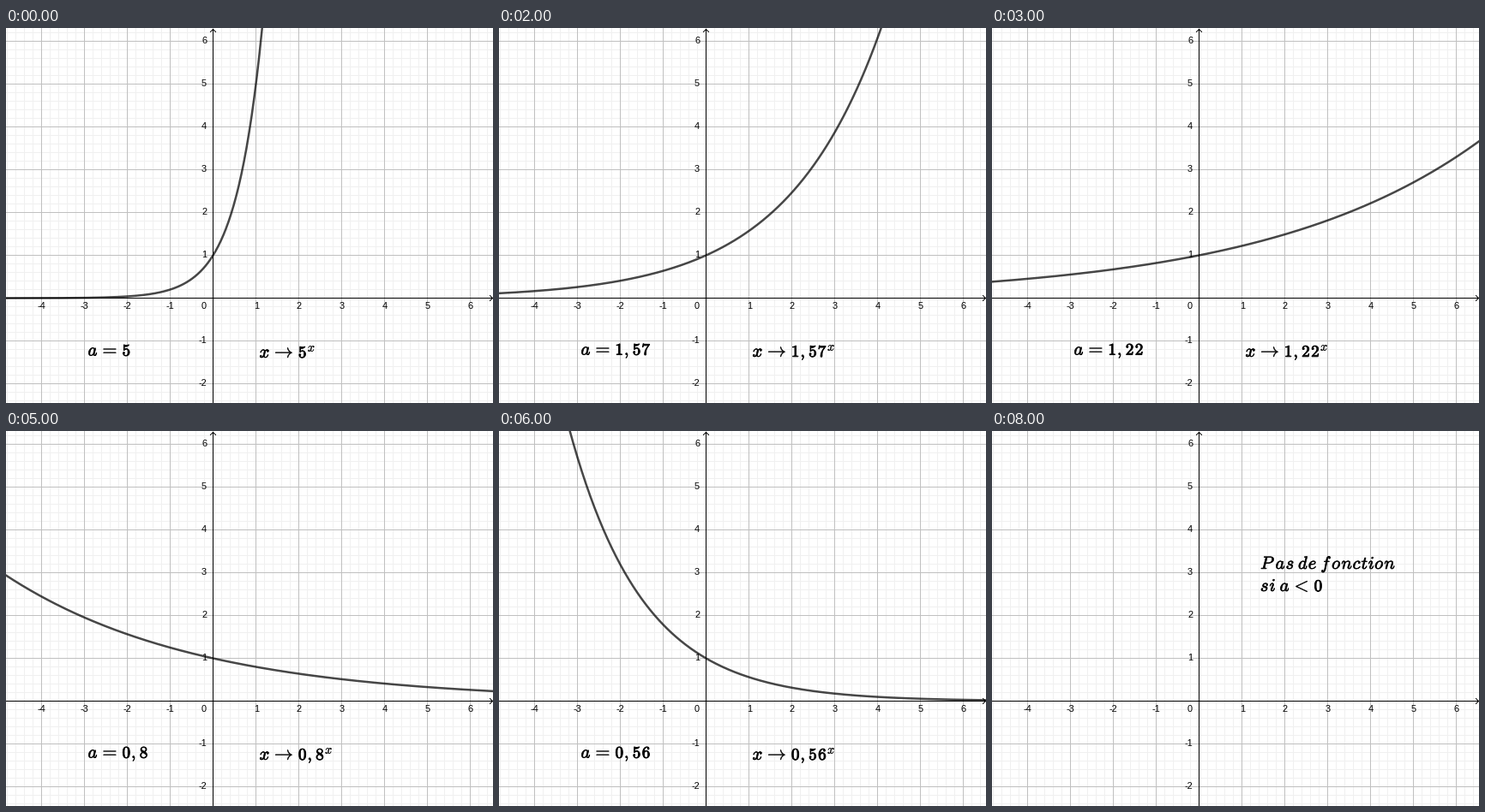
Write a matplotlib script that moves like this. It is 568 px wide and 438 px high and loops after 9 s.

```python
import matplotlib.pyplot as plt
import numpy as np
from matplotlib.animation import ArtistAnimation
from matplotlib.patches import PathPatch
from matplotlib.textpath import TextPath
from matplotlib.transforms import Affine2D

W, H, DPI = 568, 438, 64
PX = 72 / DPI              # one pixel in points
OX, OY, UNIT = 241, 315, 50
EM = 19.1                  # formula type size in pixels

plt.rcParams["mathtext.fontset"] = "cm"
plt.rcParams["font.family"] = "Liberation Sans"
plt.rcParams["axes.unicode_minus"] = False

fig = plt.figure(figsize=(W / DPI, H / DPI), dpi=DPI, facecolor="white")
ax = fig.add_axes([0, 0, 1, 1])
ax.set_xlim(-0.5, W - 0.5)
ax.set_ylim(-0.5, H - 0.5)
ax.axis("off")


def flip(y):
    return H - 1 - y


def line(xs, ys, color, width=1, **kw):
    # Integer coordinates are pixel centres, so snapping is not needed.
    ys = flip(np.asarray(ys, float))
    return ax.plot(xs, ys, color=color, lw=width * PX, snap=False, **kw)[0]


# Grid, axes and tick labels

def grid(step, color, z):
    for x in range(OX % step, W, step):
        line([x, x], [-1, H], color, zorder=z)
    for y in range(OY % step, H, step):
        line([-1, W], [y, y], color, zorder=z)


def tick(x, y, s, ha):
    ax.text(x, flip(y), s, ha=ha, va="baseline", fontsize=11 * PX, zorder=4)


grid(10, "#f0f0f0", 1)
grid(UNIT, "#c0c0c0", 2)
line([-1, W - 1], [OY, OY], "black", zorder=3)
line([OX, OX], [1, H], "black", zorder=3)
line([564, 567, 564], [OY - 3, OY, OY + 3], "black", zorder=3)
line([OX - 3, OX, OX + 3], [4, 1, 4], "black", zorder=3)

for n in range(-4, 7):
    if n:
        tick(OX + n * UNIT + 0.3, 328, str(n), "center")
for n in range(-2, 7):
    y = 328 if n == 0 else OY - n * UNIT + 3
    tick(233.7, y, str(n), "right")


# Bold formula setting: advances in em of the bold math face

LETTERS = dict(P=.92, a=.633, s=.55, d=.595, e=.54, f=.67, o=.57,
               n=.715, c=.513, t=.415, i=.404, x=.659)
OPERATORS = {"=": (.894, "="), "<": (.894, "<"), "→": (1.15, r"\rightarrow")}
THIN, MEDIUM = .167, .278


def glyph(tex, mid, base, size, stroke):
    """Draw one symbol with its ink centred on mid."""
    path = TextPath((0, 0), f"${tex}$", size=size)
    box = path.get_extents()
    shift = Affine2D().translate(mid - (box.x0 + box.x1) / 2, flip(base))
    return ax.add_patch(PathPatch(shift.transform_path(path), fc="black",
                                  ec="black", lw=stroke * PX, snap=False,
                                  zorder=6))


def formula(x, base, text):
    out, sup = [], False
    for ch in text:
        before = after = 0
        y, size, stroke, tex = base, EM, .7, ch
        if ch == "^":
            sup = True
            continue
        if ch == " ":
            x += .23 * EM
            continue
        if ch in OPERATORS:
            adv, tex = OPERATORS[ch]
            before = after = MEDIUM
            size, stroke = size * 1.15, .45
        elif ch == ",":
            adv, after = .319, THIN
        elif ch.isdigit():
            adv, stroke = .575, .9
        else:
            adv = LETTERS[ch]
            size *= 1.08
        if sup:
            adv, size, stroke = adv * .74, size * .7, .35
            y -= .375 * EM
            sup = False
        x += before * EM
        out.append(glyph(tex, x + adv * EM / 2, y, size, stroke))
        x += (adv + after) * EM
    return out


def scene(a):
    """Curve of a**x with its two captions."""
    x = np.arange(-5, 6.8, .02)
    y = a ** x
    y[y > 7] = np.nan
    curve = line(OX + UNIT * x, OY - UNIT * y, "black", 2.5, alpha=.72, zorder=5)
    num = f"{a:g}".replace(".", ",")
    drop = 0 if "," in num else 1
    tail = "=1" if a == 1 else ""
    return [curve,
            *formula(94.5, 381.2 + drop, f"a={num}"),
            *formula(294.5, 383.4 + drop, f"x→{num}^x{tail}")]


frames = [scene(a) for a in (5, 2.72, 1.57, 1.22, 1, .8, .56, .27)]
frames.append(formula(312, 160.5, "Pas de fonction")
              + formula(312, 186.5, "si a<0"))

anim = ArtistAnimation(fig, frames, interval=1000, repeat=True, repeat_delay=0)
plt.show()
```
